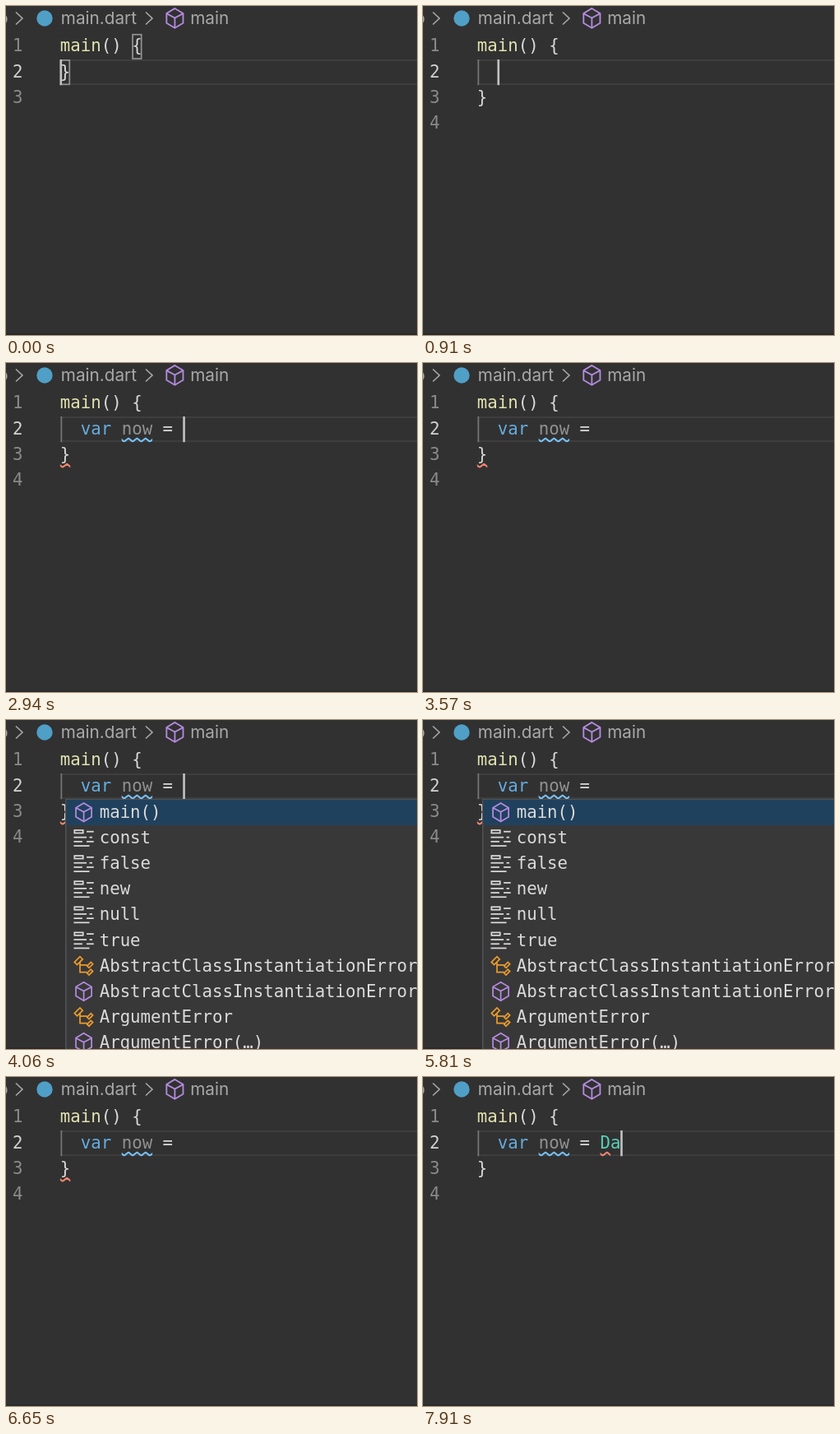
These frames come from a looping animation (500x400 px, 8 s). An HTML page with a canvas:

```html
<!DOCTYPE html>
<html lang="en">
<head>
<meta charset="utf-8">
<title>Code editor</title>
<style>
  html, body { margin: 0; width: 100%; height: 100%; overflow: hidden; background: #313131; }
  canvas { display: block; width: 500px; height: 400px; }
</style>
</head>
<body>
<canvas id="stage" width="500" height="400"></canvas>
<script>
const ctx = document.getElementById('stage').getContext('2d');
const LOOP = 8000;
const CHAR = 12.48, LINE = 31.2, LEFT = 65.8, TOP = 33.8, ASCENT = 21.5;
const UNIT = 1.733; // screen pixels per editor pixel
const MONO = '20.73px "DejaVu Sans Mono", monospace';
const SANS = '20.7px Inter, sans-serif';
const C = {
  bg: '#313131', rule: '#3e3e3e', dim: '#8a8a8a', active: '#d2d2d2', crumb: '#a9a9a9',
  text: '#dadada', fn: '#e1e2b0', key: '#65ace0', type: '#58d0b6', unused: '#929292',
  caret: '#c2c2c2', guide: '#777777', box: '#929292',
  error: '#f2866e', hint: '#78c0f8', purple: '#b58be0', orange: '#eb9c2c', file: '#4f9fc6',
  popup: '#383838', edge: '#505356', select: '#20415d'
};

// Each entry overrides the state from its time on.
const start = {
  body: null, line: 2, col: 0, caret: true, braces: true, popup: false,
  unused: false, error: 0, errorCol: 2, endError: false
};
const steps = [
  [70, { line: 1, braces: false }],
  [280, { col: 8, braces: true }],
  [700, { body: '', line: 2, col: 2, braces: false }],
  [1190, { caret: false }],
  [1540, { body: 'v', caret: true }],
  [1610, { body: 'va' }],
  [1750, { body: 'var' }],
  [1820, { body: 'var ' }],
  [1890, { error: 1 }],
  [2170, { error: 3 }],
  [2310, { caret: false }],
  [2590, { body: 'var n', caret: true }],
  [2660, { body: 'var no', error: 0 }],
  [2730, { body: 'var now' }],
  [2800, { body: 'var now ' }],
  [2870, { body: 'var now =', unused: true }],
  [2940, { body: 'var now = ', endError: true }],
  [3430, { caret: false }],
  [4060, { caret: true, popup: true }],
  [4410, { caret: false }],
  [4900, { caret: true }],
  [5460, { caret: false }],
  [5880, { popup: false }],
  [6090, { caret: true }],
  [6650, { caret: false }],
  [7140, { caret: true }],
  [7630, { body: 'var now = D' }],
  [7770, { body: 'var now = Da' }],
  [7840, { endError: false }],
  [7910, { error: 1, errorCol: 12 }]
];

const items = [
  ['method', 'main()'], ['keyword', 'const'], ['keyword', 'false'], ['keyword', 'new'],
  ['keyword', 'null'], ['keyword', 'true'],
  ['class', 'AbstractClassInstantiationError'], ['method', 'AbstractClassInstantiationError(…)'],
  ['class', 'ArgumentError'], ['method', 'ArgumentError(…)']
];

const colX = col => LEFT + col * CHAR;
const lineY = line => TOP + (line - 1) * LINE;

function stateAt(t) {
  const s = { ...start };
  for (const [at, change] of steps) if (t >= at) Object.assign(s, change);
  if (s.body) s.col = 2 + s.body.length;
  return s;
}

function rect(x, y, w, h, color) {
  ctx.fillStyle = color;
  ctx.fillRect(x, y, w, h);
}

function text(str, x, y, color, font = MONO) {
  ctx.font = font;
  ctx.fillStyle = color;
  ctx.fillText(str, x, y);
}

function code(str, line, col, color) {
  text(str, colX(col), lineY(line) + ASCENT, color);
}

function trace(points, close) {
  ctx.beginPath();
  points.forEach(([x, y]) => ctx.lineTo(x, y));
  if (close) ctx.closePath();
  ctx.stroke();
}

// Icons use a 16 unit grid around their centre.
const icons = {
  method() {
    ctx.strokeStyle = C.purple;
    trace([[8, 1.4], [13.5, 4.7], [13.5, 11.1], [8, 14.4], [2.5, 11.1], [2.5, 4.7]], true);
    trace([[2.5, 4.8], [8, 7.7], [13.5, 4.8]]);
    trace([[8, 7.7], [8, 14]]);
  },
  keyword() {
    ctx.strokeStyle = C.text;
    ctx.strokeRect(1.5, 2.5, 6, 2);
    const bars = [[10, 3, 5], [1, 7, 9], [12, 7, 2], [1, 10, 6], [10, 10, 5], [1, 13, 11]];
    for (const [x, y, w] of bars) rect(x, y, w, 1, C.text);
  },
  class() {
    ctx.strokeStyle = C.orange;
    trace([[1.5, 5.35], [5.35, 1.5], [7.2, 3.35], [3.35, 7.2]], true);
    for (const y of [0, 5]) {
      trace([[10.35, 8.05 + y], [13, 5.4 + y], [14.35, 6.7 + y], [11.7, 9.35 + y]], true);
    }
    trace([[5.35, 5.4], [5.35, 12.35], [10.4, 12.35]]);
    trace([[5.35, 7.35], [10.4, 7.35]]);
  }
};

function icon(name, x, y, scale = UNIT) {
  ctx.save();
  ctx.translate(x, y);
  ctx.scale(scale, scale);
  ctx.translate(-8, -8);
  ctx.lineWidth = 1;
  icons[name]();
  ctx.restore();
}

function squiggle(line, col, length, color) {
  const width = length * CHAR;
  ctx.save();
  ctx.translate(colX(col), lineY(line + 1) - 3 * UNIT);
  ctx.beginPath();
  ctx.rect(0, -0.5, width, 3 * UNIT + 0.5);
  ctx.clip();
  ctx.scale(UNIT, UNIT);
  ctx.strokeStyle = color;
  ctx.lineWidth = 1.2;
  const points = [];
  for (let x = 0; x < width / UNIT + 6; x += 6) points.push([x - 1.2, 0.3], [x + 1.75, 2.7]);
  trace(points);
  ctx.restore();
}

function chevron(x) {
  ctx.strokeStyle = C.crumb;
  ctx.lineWidth = 1.6;
  trace([[x, 7.5], [x + 8, 15], [x, 22.5]]);
}

function breadcrumbs() {
  text('o', -9.8, 22, C.crumb, SANS);
  chevron(12);
  ctx.fillStyle = C.file;
  ctx.beginPath();
  ctx.arc(47, 15, 9.7, 0, 2 * Math.PI);
  ctx.fill();
  text('main.dart', 66.8, 22, C.crumb, SANS);
  chevron(170);
  icon('method', 205.4, 15, 1.83);
  text('main', 224.2, 22, C.crumb, SANS);
}

function brace(char, line, col, boxed) {
  code(char, line, col, C.text);
  if (!boxed) return;
  ctx.strokeStyle = C.box;
  ctx.lineWidth = UNIT;
  ctx.strokeRect(colX(col) + 0.9, lineY(line) + 0.9, 10.6, LINE - 1.8);
}

function statement(s) {
  const { body } = s;
  rect(66.5, lineY(2), UNIT, LINE, C.guide);
  code(body.slice(0, 3), 2, 2, body.length < 3 ? C.text : C.key);
  code(body.slice(4, 7), 2, 6, s.unused ? C.unused : C.text);
  code(body.slice(8, 9), 2, 10, C.text);
  code(body.slice(10), 2, 12, C.type);
  if (s.error) squiggle(2, s.errorCol, s.error, C.error);
  if (s.unused) squiggle(2, 6, 3, C.hint);
}

function editor(s) {
  const open = s.body !== null;
  const last = open ? 3 : 2;
  const y = Math.round(lineY(s.line));
  rect(LEFT, y, 500 - LEFT, 2, C.rule);
  rect(LEFT, y + 29, 500 - LEFT, 2, C.rule);

  for (let n = 1; n <= last + 1; n++) {
    text(n, 8, lineY(n) + ASCENT, n === s.line ? C.active : C.dim);
  }
  code('main', 1, 0, C.fn);
  code('()', 1, 4, C.text);
  brace('{', 1, 7, s.braces);
  if (open) statement(s);
  brace('}', last, 0, s.braces);
  if (s.endError) squiggle(last, 0, 1, C.error);
  if (s.caret) rect(colX(s.col) - 0.3, lineY(s.line), 2.6, LINE, C.caret);
}

function suggestions() {
  rect(72, 96, 428, 304, C.edge);
  rect(73.5, 97, 426.5, 303, C.popup);
  rect(73.5, 97, 426.5, 31, C.select);
  items.forEach(([kind, label], i) => {
    const y = 112.4 + i * 31.1;
    icon(kind, 94.6, y);
    text(label, 113.7, y + 6.6, C.text);
  });
}

function draw(t) {
  const s = stateAt(t);
  rect(0, 0, 500, 400, C.bg);
  rect(0, 398, 500, 2, '#292929');
  breadcrumbs();
  editor(s);
  if (s.popup) suggestions();
}

const begin = performance.now();
function tick() {
  draw((performance.now() - begin) % LOOP);
  requestAnimationFrame(tick);
}
tick();
</script>
</body>
</html>
```
